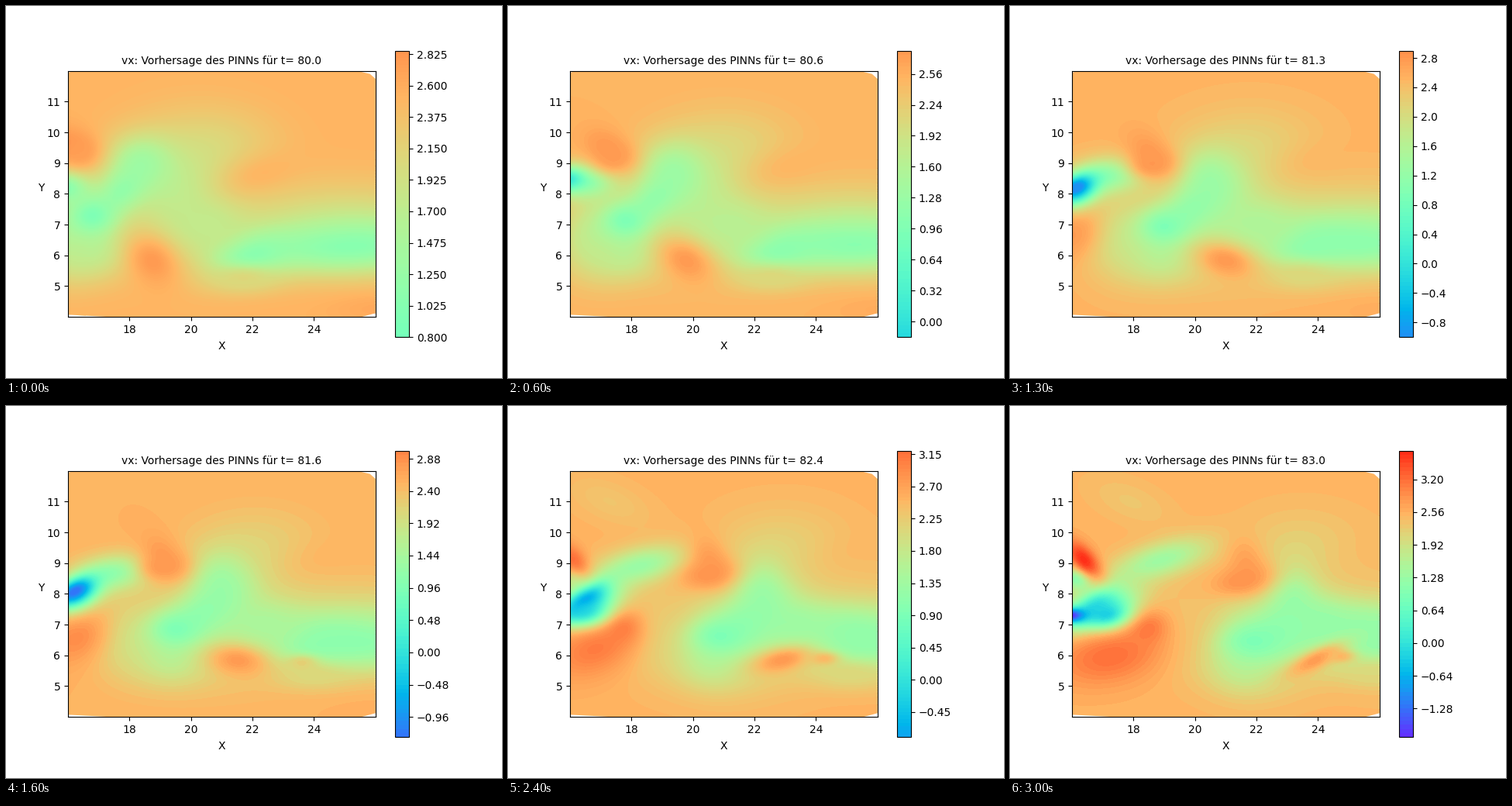
A matplotlib script that plays this animation: 640x480 px, repeating every 3100 ms.

```python
import math

import matplotlib.pyplot as plt
import numpy as np
from matplotlib.animation import FuncAnimation
from matplotlib.patches import Polygon

FRAMES, INTERVAL = 31, 100
FREE_STREAM = 2.52
U = 1.7            # drift speed of the wake
EASE_IN = 0.7      # time a new patch takes to appear
VMIN, VMAX = -2.2, 4.1
MAX_BANDS = 81
STEPS = (0.02, 0.025, 0.03, 0.04, 0.05, 0.06, 0.08, 0.1)

X, Y = np.meshgrid(np.linspace(16, 26, 161), np.linspace(4, 12, 129))

# convex hull of the sampled points
HULL = [(16, 11.94), (16.2, 12), (25.4, 12), (25.82, 11.9), (26, 11.74),
        (26, 4.12), (25.55, 4), (17.3, 4), (16, 4.07)]

# value range of the field at a few times
RANGE_T = (0, 0.4, 0.9, 1.6, 2.0, 2.4, 3.0)
RANGE_LO = (0.815, 0.25, -0.68, -1.23, -1.0, -0.78, -1.8)
RANGE_HI = (2.835, 2.79, 2.78, 2.98, 3.15, 3.18, 3.72)

layers = []


def smooth(s):
    s = min(max(s, 0), 1)
    return s * s * (3 - 2 * s)


def blob(x, y, rx, ry, value, tilt=0, u=U, v=0, grow=0, swell=0, spin=0,
         gain=0, born=None, life=None):
    """Add a soft ellipse that drifts at (u, v).

    grow and swell are the rates of its two radii, spin that of its tilt and
    gain that of its value. It eases in at born, or pulses once over life.
    """
    def paint(z, t):
        age = max(t - (born or 0), 0)
        weight = 1
        if life:
            weight = math.sin(math.pi * min(age / life, 1))
        elif born is not None:
            weight = smooth(age / EASE_IN)
        a = math.radians(tilt + spin * age)
        c, s = math.cos(a), math.sin(a)
        dx, dy = X - x - u * age, Y - y - v * age
        r2 = (((c * dx + s * dy) / (rx * (1 + grow * age))) ** 2
              + ((c * dy - s * dx) / (ry * (1 + swell * age))) ** 2)
        z += (value + gain * age - z) * weight * np.exp(-r2)

    layers.append(paint)


# faint veils and the pale halo around the wake
blob(20.8, 9.6, 2.0, 1.2, 2.22, u=0.9)
blob(16.5, 11, 1.4, 0.65, 2.4, tilt=-22, u=1, gain=-0.07, born=1.6)
blob(19.8, 7.9, 2.2, 2.0, 1.72, u=0.85, v=-0.33, grow=-0.06, swell=-0.06)
blob(22.4, 8.5, 1.5, 0.8, 2.6, tilt=10, u=1.4, v=0.35, gain=-0.05)
blob(26, 4.3, 1.5, 0.5, 2.65, u=0, gain=-0.05)

# slow tongue on the right
blob(25, 7.05, 3.8, 1.3, 1.95, u=0.3, v=-0.1, gain=-0.06)
blob(25.2, 6.3, 3.6, 0.88, 1.05, tilt=2, u=0.1, v=0.09, grow=-0.13,
     spin=-2.5, gain=0.04)
blob(22, 5.95, 1.25, 0.7, 1.0, tilt=12, u=1.35, v=0.25, spin=-7, gain=0.07)
blob(21.7, 5.25, 1.2, 0.45, 2.08, u=1.4, v=0.05)

# green lobes drifting through the middle
blob(16, 6.6, 1.2, 1.3, 1.65, u=1.2, gain=0.22)
blob(16.8, 6.2, 1.3, 0.9, 1.7, u=1.6, v=-0.2)
blob(20.5, 7, 1.15, 0.7, 1.75, u=1.2, gain=-0.18)
blob(18.4, 9, 1.1, 0.9, 1.38, u=1.6, v=-0.45, grow=-0.1, swell=0.1, gain=-0.04)
blob(17.8, 8.15, 1.05, 0.7, 1.2, tilt=42, v=-0.4, grow=0.08, spin=-6)
blob(16.8, 7.3, 0.8, 0.65, 0.92, v=-0.28, grow=0.12)

# fast patch below the wake, with its forerunner
blob(18.75, 5.8, 0.95, 0.75, 2.8, tilt=-45, u=1.73, v=0.02, grow=0.04,
     swell=-0.19, spin=24)
blob(23.3, 5.75, 0.5, 0.22, 2.5, u=0.8, v=0.12, born=1.2)

# fast patch entering at the lower left
blob(15.7, 6.9, 0.7, 0.75, 2.75, tilt=50, u=0.7, v=-0.42, grow=0.7,
     swell=0.1, spin=-18, gain=0.2, born=0.8)
blob(16.6, 6.9, 0.5, 0.42, 3.0, tilt=15, u=1.3, grow=0.25, swell=0.25,
     gain=0.1, born=1.6)

# plume and slow jet at the inlet
blob(15.9, 8.2, 0.85, 0.58, 1.05, tilt=-5, u=1, v=0.3, grow=0.3, spin=7, gain=0.09)
blob(15.9, 8.3, 0.5, 0.45, 0.8, tilt=30, u=0.4, v=-0.28, grow=0.6,
     swell=0.15, spin=-5, gain=-0.15, born=0.5)
blob(15.8, 8.68, 0.4, 0.38, -1.35, tilt=10, u=0.28, v=-0.4, grow=0.5,
     spin=12, born=0.1, life=3.2)
blob(16, 7.45, 0.7, 0.42, -0.3, tilt=5, u=1, v=-0.1, born=1.9)
blob(15.9, 7.3, 0.45, 0.25, -1.9, u=0.1, born=2.3)
blob(16.1, 8.5, 0.5, 0.4, 1.0, u=0.1, born=2.1)

# fast patches along the upper edge of the wake
blob(16.1, 9.6, 0.9, 0.6, 2.84, tilt=-20, u=1.85, v=-0.2, spin=-20, gain=-0.045)
blob(16.4, 9.4, 0.45, 0.42, 2.75, v=-0.32, grow=0.45, swell=0.06, spin=4, gain=0.04)
blob(15.8, 9.15, 0.45, 0.36, 2.5, tilt=-48, u=0.45, v=-0.03, grow=0.5,
     gain=0.95, born=1.7)


def field(t):
    z = np.full(X.shape, FREE_STREAM)
    for paint in layers:
        paint(z, t)
    return z


def band_levels(lo, hi):
    step = next(s for s in STEPS if s >= (hi - lo) / MAX_BANDS)
    return np.arange(math.floor(lo / step), math.ceil(hi / step) + 1) * step


fig = plt.figure(figsize=(6.4, 4.8), dpi=100)


def draw(i):
    t = i * 0.1
    lo, hi = np.interp(t, RANGE_T, RANGE_LO), np.interp(t, RANGE_T, RANGE_HI)
    fig.clear()
    ax = fig.add_axes([0.125, 0.11, 0.62, 0.77])
    cax = fig.add_axes([0.78375, 0.11, 0.028875, 0.77])
    cs = ax.contourf(X, Y, np.clip(field(t), lo, hi), levels=band_levels(lo, hi),
                     cmap="rainbow", vmin=VMIN, vmax=VMAX)
    cs.set_clip_path(Polygon(HULL, transform=ax.transData))
    fig.colorbar(cs, cax=cax)
    ax.set(xlim=(16, 26), ylim=(4, 12), aspect="equal",
           xticks=range(18, 25, 2), yticks=range(5, 12))
    ax.set_xlabel("X", labelpad=5)
    ax.set_ylabel("Y", rotation=0, labelpad=5)
    ax.set_title(f"vx: Vorhersage des PINNs für t= {80 + t:.1f}", fontsize=10)
    return []


anim = FuncAnimation(fig, draw, frames=FRAMES, interval=INTERVAL,
                     repeat=True, repeat_delay=0, blit=False)
plt.show()
```
